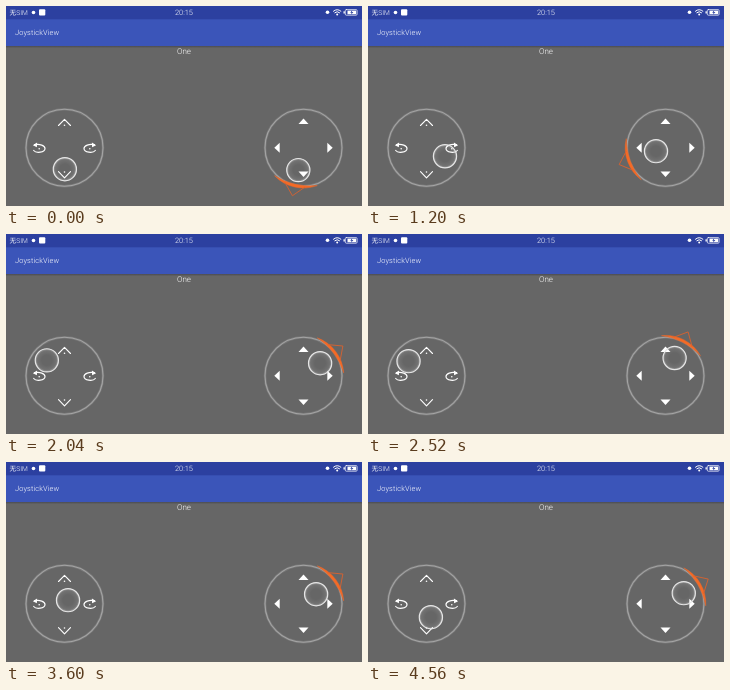
Write an HTML page that moves like this. It is 356x200 px and loops after 4680 ms.

```html
<!DOCTYPE html>
<html lang="en">
<head>
<meta charset="utf-8">
<title>JoystickView</title>
<style>
  html, body { margin: 0; width: 100%; height: 100%; overflow: hidden; background: #666; }
  svg { display: block; width: 100vw; height: 100vh; }
  text {
    fill: #fff; font-family: Roboto, "Noto Sans CJK SC", "Noto Sans CJK", sans-serif;
    font-weight: 300; text-rendering: geometricPrecision;
  }
  .line { fill: none; stroke: #fff; stroke-linecap: round; stroke-linejoin: round; }
  .solid { fill: #fff; }
</style>
</head>
<body>
<svg viewBox="0 0 356 200">
  <defs>
    <linearGradient id="shade" x2="0" y2="1">
      <stop stop-color="#4b4c52"/>
      <stop offset="1" stop-color="#666"/>
    </linearGradient>
    <radialGradient id="glass">
      <stop offset=".45" stop-color="#fff" stop-opacity="0"/>
      <stop offset=".82" stop-color="#fff" stop-opacity=".08"/>
      <stop offset="1" stop-color="#fff" stop-opacity=".38"/>
    </radialGradient>
    <g id="ring" fill="none">
      <circle r="38.5" stroke="#787878" stroke-width="2.5"/>
      <circle r="38.5" stroke="#a4a4a4" stroke-width="1.1"/>
    </g>
    <g id="knob">
      <circle r="11.6" fill="url(#glass)"/>
      <circle r="11.6" fill="none" stroke="#e6e6e6" stroke-width="1.2"/>
    </g>
    <g id="chevron">
      <path class="line" stroke-width="1.1" d="M-6 -22.2L0 -28.3L6 -22.2"/>
      <circle class="solid" cy="-22.5" r=".8"/>
    </g>
    <path id="wedge" class="solid" d="M-5 -23.8H5L0 -29.2Z"/>
    <g id="turn">
      <path class="line" stroke-width="1.2" d="M-30 -3C-24.6 -4 -19.5 -2.3 -19.5 .8C-19.5 5 -28.6 5.8 -30.8 2.8"/>
      <path class="solid" d="M-31.6 -2.4L-27.4 -5.3L-27.6 -.4Z"/>
      <circle class="solid" cx="-25.3" cy="1" r=".8"/>
    </g>
  </defs>

  <rect width="356" height="200" fill="#666"/>
  <rect width="356" height="40" fill="#3b55b9"/>
  <rect width="356" height="13.3" fill="#2c40a0"/>
  <rect y="40" width="356" height="2.2" fill="url(#shade)"/>

  <text x="3.5" y="9.2" font-size="6.7">无SIM</text>
  <circle class="solid" cx="27.5" cy="6.5" r="1.8"/>
  <rect class="solid" x="33" y="3.3" width="6.3" height="6.3" rx="1"/>
  <text x="178" y="9.3" font-size="7.4" text-anchor="middle">20:15</text>
  <circle class="solid" cx="321.5" cy="6.3" r="1.8"/>
  <path class="line" d="M327.5 5.2Q331.2 2 334.9 5.2M328.8 6.7Q331.2 4.6 333.6 6.7"/>
  <circle class="solid" cx="331.2" cy="8.5" r="1"/>
  <rect class="line" x="339.3" y="3.6" width="11.8" height="5.6" rx="1" stroke-width=".7"/>
  <rect class="solid" x="341.5" y="4.6" width="8.6" height="3.6"/>
  <rect class="solid" x="337.5" y="5.3" width="1.3" height="2.2"/>
  <path d="M346.2 4.2L344.2 6.8H345.6L345 8.8L347.4 6H346Z" fill="#2c40a0"/>
  <text x="9" y="29" font-size="7.4" letter-spacing=".15">JoystickView</text>
  <text x="178" y="48" font-size="8" text-anchor="middle">One</text>

  <g transform="translate(58.5 141.7)">
    <use href="#ring"/>
    <use href="#chevron"/>
    <use href="#chevron" transform="translate(0 1.8) scale(1 -1)"/>
    <use href="#turn"/>
    <use href="#turn" transform="scale(-1 1)"/>
    <use href="#knob" id="leftKnob"/>
  </g>

  <g transform="translate(297.5 141.7)">
    <use href="#ring"/>
    <use href="#wedge"/>
    <use href="#wedge" transform="rotate(90)"/>
    <use href="#wedge" transform="rotate(180)"/>
    <use href="#wedge" transform="rotate(270)"/>
    <g id="pointer">
      <path d="M33.8 -21.9A40.3 40.3 0 0 1 33.8 21.9A67 67 0 0 0 33.8 -21.9Z"
            fill="#f66a24" stroke="#e8682d" stroke-width=".5"/>
      <path d="M38 -10.3L49.3 0L38 10.3" fill="none" stroke="#dc622e" stroke-width=".8"/>
    </g>
    <use href="#knob" id="rightKnob"/>
  </g>
</svg>
<script>
  const STEP = 120, STEPS = 39;

  // Key poses: step, distance from the pad centre, angle in degrees
  const leftKeys = [
    [0, 21.5, 89], [4, 22.2, 206], [10, 20.4, 385], [15, 23.4, 581],
    [20, 23.4, 581], [25, 20.8, 562], [30, 5, 675], [35, 20, 563], [38, 14.2, 432]
  ];
  const rightKeys = [
    [0, 23, 103], [4, 17, 8], [10, 10.1, 160], [15, 20.8, 323],
    [20, 20.8, 323], [25, 11.8, 76], [30, 15.8, 323], [38, 21.1, 690]
  ];

  const byId = id => document.getElementById(id);
  const left = byId("leftKnob"), right = byId("rightKnob"), pointer = byId("pointer");
  const ease = k => k * k * (3 - 2 * k);

  function pose(keys, step) {
    const i = Math.max(1, keys.findIndex(key => key[0] >= step));
    const [t0, r0, a0] = keys[i - 1], [t1, r1, a1] = keys[i];
    const k = ease((step - t0) / (t1 - t0));
    return [r0 + (r1 - r0) * k, a0 + (a1 - a0) * k];
  }

  function place(knob, [radius, angle]) {
    knob.setAttribute("transform", `rotate(${angle}) translate(${radius}) rotate(${-angle})`);
  }

  const start = performance.now();
  function draw() {
    const step = Math.floor(Math.max(0, performance.now() - start) / STEP) % STEPS;
    const tilt = pose(rightKeys, step);
    place(left, pose(leftKeys, step));
    place(right, tilt);
    pointer.setAttribute("transform", `rotate(${tilt[1]})`);
    requestAnimationFrame(draw);
  }
  draw();
</script>
</body>
</html>
```
